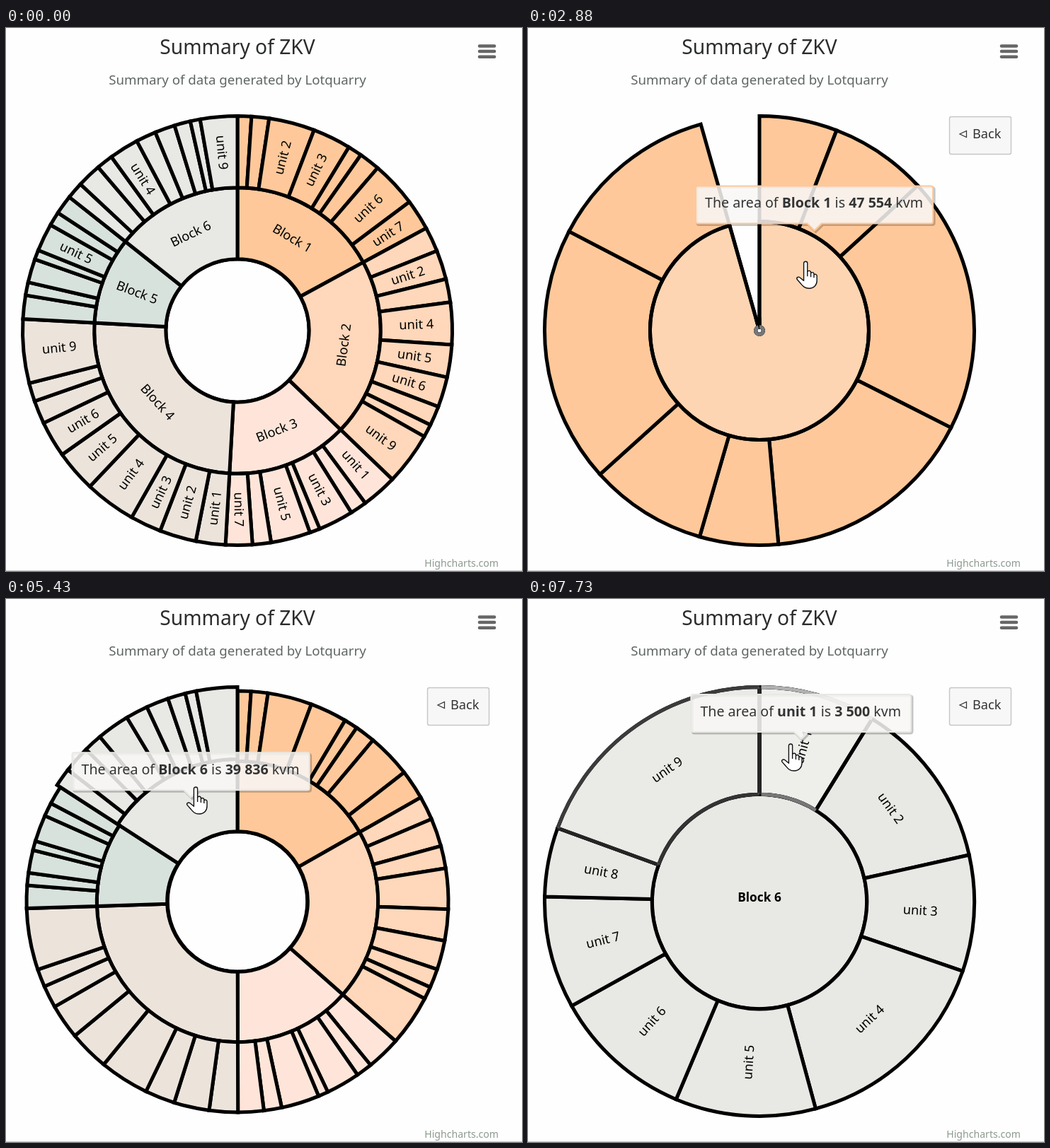
Animation of 729 by 768 pixels, one loop 8 s. Source, as an HTML page:

```html
<!DOCTYPE html>
<html lang="en">
<head>
<meta charset="utf-8">
<title>Sunburst summary</title>
<style>
  html, body { margin: 0; width: 100%; height: 100%; overflow: hidden; background: #fefefe; }
  svg { display: block; width: 729px; height: 768px; font-family: "Noto Sans", "Open Sans", sans-serif; }
  text { white-space: pre; }
</style>
</head>
<body>
<svg id="stage" viewBox="0 0 729 768">
  <g text-anchor="middle">
    <text x="327" y="37" font-size="28.2" fill="#2b2d2c">Summary of ZKV</text>
    <text x="327" y="80" font-size="18.7" fill="#5f6663">Summary of data generated by Lotquarry</text>
  </g>
  <path d="M669 25.5H690M669 33H690M669 40.7H690" stroke="#666" stroke-width="4.6" stroke-linecap="round"/>
  <text x="696" y="762" font-size="14.1" fill="#8c998f" text-anchor="end">Highcharts.com</text>
  <path d="M0 767.5H729" stroke="#c8c8c8"/>
  <g id="sectors" stroke="#000" stroke-width="5"></g>
  <g id="glow" stroke-width="5"></g>
  <g id="labels" text-anchor="middle"></g>
  <g id="back">
    <rect x="595.5" y="125.5" width="87" height="53" rx="2.5" fill="#f7f7f7" stroke="#c6c6c6" stroke-width="1.4"/>
    <path d="M619.5 145.5V154.5L610 150Z" fill="none" stroke="#333" stroke-width="1.2"/>
    <text x="628" y="156" font-size="18.2" fill="#333">Back</text>
  </g>
  <g id="tip">
    <path id="shade" transform="translate(2 2)" fill="none" stroke="#000" stroke-opacity=".22" stroke-width="3"/>
    <path id="box" fill="#f8f7f6" fill-opacity=".86" stroke-width="2"/>
    <text id="msg" font-size="19.6" fill="#333"></text>
  </g>
  <path id="hand" fill="#fff" stroke="#111" stroke-width="1.4" stroke-linejoin="round"
    d="M-2.6 2.5C-2.6-.8 2.6-.8 2.6 2.5V15C3.2 12.3 7.3 12.7 7.4 15.6V17C8.3 14.6 11.7 15.2 11.8 17.6V19C12.8 17.2 16 18 16 20.4V27C16 33 12 38 5 38C-2 38-4 34.5-7.5 30.5L-11.8 25.6C-13.6 23 -10.5 20.8-8 22.8L-2.6 27.2ZM2.6 15V21M7.4 17V22M11.8 19V23"/>
</svg>
<script>
const LOOP = 8000, DRILL = 500, CX = 327, CY = 428, R = 303.5, DEG = Math.PI / 180;
const colors = ['#fefefe', '#fec89a', '#ffd7ba', '#ffe5d9', '#ece4db', '#d8e2dc', '#e8e8e4'];
// Chart data: unit areas of each block
const areas = [
  [2908, 3655, 9592, 8016, 2935, 4389, 9620, 6439],
  [5180, 6110, 4870, 8820, 6810, 6340, 4100, 2710, 11060],
  [7425, 3480, 7345, 2165, 8275, 3870, 5570],
  [6190, 7660, 6500, 10750, 8740, 7580, 4870, 3870, 13380],
  [4950, 2710, 4950, 2010, 5800, 2940, 4010],
  [3500, 5070, 3480, 6190, 4205, 4215, 3365, 2070, 7741]
];
// Clicks: time, block, 1 = drill in / 0 = drill out
const clicks = [[2455, 1, 1], [3853, 1, 0], [5388, 6, 1]];
// Pointer moves: start, end, x, y, bulge to the left
const entry = [455, 775];
const moves = [
  [60, 820, 388, 325], [1060, 1370, 355, 404], [1720, 2200, 419, 286],
  [2600, 3250, 351, 398], [3990, 4300, 328, 254], [4620, 5180, 268, 266],
  [5450, 5890, 281, 421], [6080, 6400, 195, 550], [6450, 7600, 371, 205, 150]
];

const $ = id => document.getElementById(id);
const clamp = (v, lo = 0, hi = 1) => Math.min(hi, Math.max(lo, v));
const ease = v => (1 - Math.cos(Math.PI * clamp(v))) / 2;
const mix = (a, b, p) => a + (b - a) * p;
const sum = list => list.reduce((a, b) => a + b, 0);
const add = (parent, tag) => parent.appendChild(document.createElementNS('http://www.w3.org/2000/svg', tag));
const set = (el, attrs) => Object.entries(attrs).forEach(([k, v]) => el.setAttribute(k, v));

const total = sum(areas.map(sum));
const nodes = [{ block: 0, unit: 0, name: '', value: total, a0: 0, a1: 360, r0: 0, r1: R / 3 }];
let turn = 0;
areas.forEach((list, i) => {
  const block = i + 1, value = sum(list);
  nodes.push({ block, unit: 0, name: 'Block ' + block, value,
    a0: turn, a1: turn + value / total * 360, r0: R / 3, r1: R * 2 / 3 });
  list.forEach((v, j) => {
    const a1 = turn + v / total * 360, unit = j + 1;
    // The first block counts its units from zero
    nodes.push({ block, unit, name: 'unit ' + (block === 1 ? j : unit), value: v,
      last: unit === list.length, a0: turn, a1, r0: R * 2 / 3, r1: R });
    turn = a1;
  });
});
const blockNode = block => nodes.find(n => n.block === block && !n.unit);
nodes.sort((a, b) => (a.unit > 0) - (b.unit > 0)).forEach(n => {
  n.path = add($('sectors'), 'path');
  n.path.setAttribute('fill', colors[n.block]);
  n.text = add($('labels'), 'text');
  n.text.textContent = n.name;
});

function view(t) {
  const click = clicks.filter(c => c[0] <= t).pop();
  if (!click) return { start: -LOOP, block: 0, p: 0, goal: 0, labels: 1 };
  const [start, block, goal] = click, q = ease((t - start) / DRILL);
  return { start, block, goal, p: goal ? q : 1 - q, labels: ease((t - start) / DRILL - 1) };
}

function shape(n, block, p) {
  let to = { a0: n.a0, a1: n.a1, r0: 0, r1: 0 };
  if (block && n.block === block) {
    const b = blockNode(block), scale = a => (a - b.a0) / (b.a1 - b.a0) * 360;
    to = { a0: scale(n.a0), a1: scale(n.a1), r0: n.unit ? R / 2 : 0, r1: n.unit ? R : R / 2 };
  } else if (n.block) {
    to.a0 = to.a1 = n.block > block ? 360 : 0;
  }
  const s = {};
  for (const k in to) s[k] = mix(n[k], to[k], p);
  return s;
}

const at = (r, a) => [CX + r * Math.sin(a * DEG), CY - r * Math.cos(a * DEG)];
const pt = (r, a) => at(r, a).map(v => v.toFixed(2)).join(' ');
const arc = (r, from, to) =>
  `A${r} ${r} 0 ${+(Math.abs(to - from) > 180)} ${+(to > from)} ${pt(r, to)}`;
const ring = r => `M${pt(r, 0)}${arc(r, 0, 180)}${arc(r, 180, 360)}Z`;
function outline({ a0, a1, r0, r1 }) {
  if (a1 - a0 > 359.99) return ring(r1) + (r0 > .5 ? ring(r0) : '');
  return `M${pt(r0, a0)}L${pt(r1, a0)}${arc(r1, a0, a1)}L${pt(r0, a1)}${arc(r0, a1, a0)}Z`;
}

function pointer(t) {
  let [x, y] = entry;
  for (const [start, end, tx, ty, bulge = 0] of moves) {
    if (t < start) break;
    const p = ease((t - start) / (end - start));
    const dx = tx - x, dy = ty - y, side = bulge * Math.sin(Math.PI * p) / Math.hypot(dx, dy);
    x += dx * p + dy * side;
    y += dy * p - dx * side;
  }
  return [x, y];
}

function hit(t, v) {
  const [x, y] = pointer(t), r = Math.hypot(x - CX, y - CY);
  const a = (Math.atan2(x - CX, CY - y) / DEG + 360) % 360;
  return nodes.find(n => {
    const s = shape(n, v.block, v.p);
    return r >= s.r0 && r < s.r1 && a >= s.a0 && a < s.a1;
  });
}

function anchor(n, v) {
  const s = shape(n, v.block, v.goal);
  const [x, y] = s.r0 < 1 ? [CX, CY] : at((s.r0 + s.r1) / 2, (s.a0 + s.a1) / 2);
  return { x, y: y - 11 };
}

// Play the pointer once: hovered sectors glow, settled ones get the tooltip
const glows = [], tips = [];
function rehearse() {
  let start, hover, tip = {};
  const retarget = (t, n, v) => {
    const goal = anchor(n, v);
    if (tip.n === n && tip.x === goal.x && tip.y === goal.y) return;
    tips.push(tip = { t, n, ...goal });
  };
  for (let t = 0; t < LOOP; t++) {
    const v = view(t), age = (t - v.start) / DRILL;
    if (v.start !== start) {
      start = v.start;
      hover = null;
      if (tip.n && !v.goal) retarget(t, tip.n, v);
    }
    if (age < .5) continue;
    const n = hit(t, v);
    if (hover) hover.to = t;
    if (n && (!hover || hover.n !== n)) glows.push(hover = { n, from: t, to: t });
    if (n && age >= 1) retarget(t, n, v);
  }
}

function drawLabel(n, s) {
  const mid = (s.a0 + s.a1) / 2, r = (s.r0 + s.r1) / 2;
  const len = (s.a1 - s.a0) * DEG * r, core = s.r0 < 1;
  n.text.style.display = n.block && s.r1 > 1 && (core || len > 30) ? '' : 'none';
  if (core) {
    set(n.text, { transform: `translate(${CX} ${CY})`, 'font-weight': 700, 'font-size': 17.3, dy: 0 });
    return;
  }
  // Wide sectors read along the arc, narrow ones along the radius
  const rot = len > s.r1 - s.r0
    ? (mid > 90 && mid < 270 ? mid - 180 : mid)
    : (mid < 180 ? mid - 90 : mid + 90);
  set(n.text, {
    transform: `translate(${pt(r, mid)}) rotate(${rot.toFixed(2)})`,
    'font-weight': 400, 'font-size': 18.2, dy: '.33em'
  });
}

function glow(n, s, h) {
  const line = (d, color) => `<path d="${d}" fill="none" stroke="${color}" stroke-opacity="${h}"/>`;
  const bend = (r, { a0, a1 }) => `M${pt(r, a0)}${arc(r, a0, a1)}`;
  if (!n.block) return line(bend(s.r1, blockNode(4)), '#777');
  let out = `<path d="${outline(s)}" fill="#fff" fill-opacity="${.23 * h}" stroke="#000"/>`;
  if (s.r0 < 1) return out;
  out += line(bend(s.r0, s), n.last ? '#999' : '#777');
  if (n.unit) out += line(bend(s.r1, s), '#b0b0b0');
  if (n.last) out += line([s.a0, s.a1].map(a => `M${pt(s.r0, a)}L${pt(s.r1, a)}`).join(''), '#707070');
  return out;
}

function drawGlows(t, v) {
  $('glow').innerHTML = glows
    .filter(g => g.from >= v.start && g.from < t && t < g.to + 450)
    .sort((a, b) => a.n.unit - b.n.unit)
    .map(({ n, from, to }) => {
      const h = clamp((t - from) / 50) * (1 - clamp((t - to - 100) / 350));
      return glow(n, shape(n, v.block, v.p), h);
    }).join('');
}

let shown = null;
function drawTip(t) {
  const list = tips.filter(e => e.t <= t);
  $('tip').style.display = list.length ? '' : 'none';
  if (!list.length) return;
  let { x, y, n } = list[0];
  list.forEach((e, i) => {
    const until = i + 1 < list.length ? list[i + 1].t : t;
    const steps = Math.floor((until - e.t) / 32);
    x = mix(e.x, x, (2 / 3) ** steps);
    y = mix(e.y, y, .5 ** steps);
    n = e.n;
  });
  if (shown !== n) {
    shown = n;
    const num = String(n.value).replace(/(\d)(?=(\d{3})+$)/g, '$1 ');
    const bold = s => `<tspan font-weight="700">${s}</tspan>`;
    $('msg').innerHTML = `The area of ${n.name ? bold(n.name) + ' ' : ''}is ${bold(num)} kvm`;
    $('box').setAttribute('stroke', n.block ? colors[n.block] : '#eee');
  }
  const w = $('msg').getComputedTextLength() + 27;
  const left = clamp(x - w / 2, 1, 728 - w), top = y - 63, low = y - 10;
  const tipX = clamp(x, left + 14, left + w - 14);
  const d = `M${left + 3} ${top}H${left + w - 3}q3 0 3 3V${low - 3}q0 3-3 3H${tipX + 10}` +
    `L${tipX} ${y}L${tipX - 10} ${low}H${left + 3}q-3 0-3-3V${top + 3}q0-3 3-3Z`;
  set($('box'), { d });
  set($('shade'), { d });
  set($('msg'), { x: left + 13, y: top + 30.5 });
}

function draw(t) {
  const v = view(t);
  nodes.forEach(n => {
    const s = shape(n, v.block, v.p);
    n.path.style.display = s.r1 < 1 ? 'none' : '';
    n.path.setAttribute('d', outline(s));
    drawLabel(n, s);
  });
  $('labels').setAttribute('opacity', v.labels);
  $('back').style.display = v.goal ? '' : 'none';
  drawGlows(t, v);
  drawTip(t);
  $('hand').setAttribute('transform', `translate(${pointer(t)})`);
}

function tick() {
  draw(performance.now() % LOOP);
  requestAnimationFrame(tick);
}
rehearse();
tick();
</script>
</body>
</html>
```
